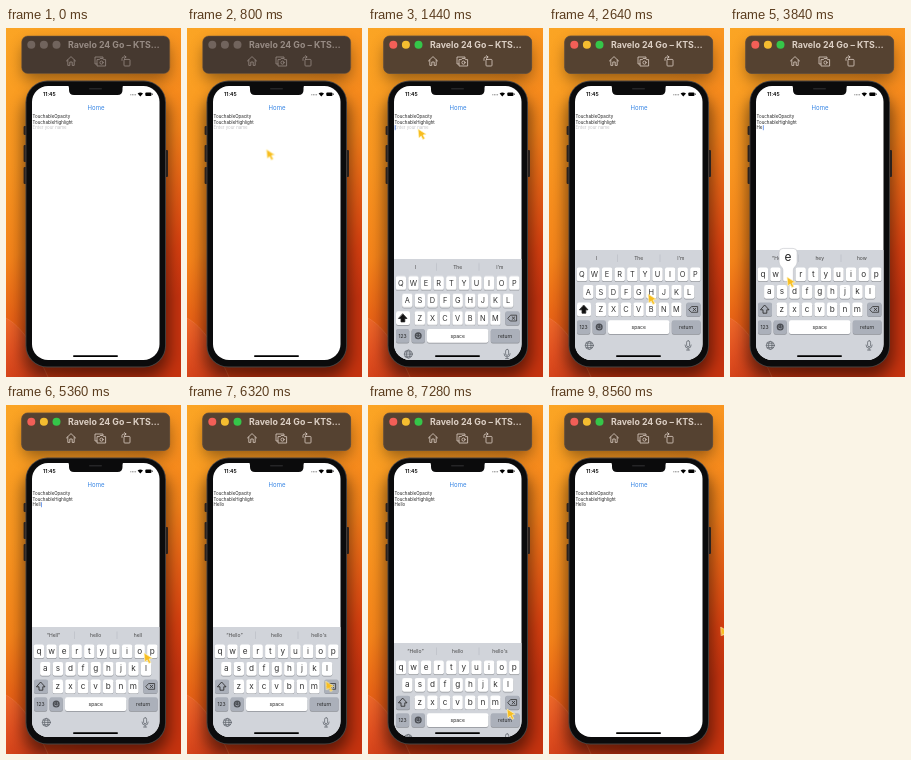
Write an HTML page that moves like this. It is 175x349 px and loops after 8.64 s.

```html
<!DOCTYPE html>
<html lang="en">
<head>
<meta charset="utf-8">
<title>Text input demo</title>
<style>
html, body { margin: 0; width: 100%; height: 100%; overflow: hidden; background: #ee8119; }
svg { display: block; width: 100%; height: 100%; }
text { font-family: Inter, "Liberation Sans", sans-serif; }
.mid { text-anchor: middle; }
.body { font-size: 4.4px; fill: #222; }
.line { fill: none; stroke-width: .8; stroke-linecap: round; stroke-linejoin: round; }
</style>
</head>
<body>
<svg id="stage" viewBox="0 0 175 349" preserveAspectRatio="none">
  <defs>
    <linearGradient id="sky" x1="0" y1="0" x2=".4" y2="1">
      <stop offset="0" stop-color="#fba524"/>
      <stop offset=".35" stop-color="#f99520"/>
      <stop offset=".58" stop-color="#f4831a"/>
      <stop offset=".74" stop-color="#e65f15"/>
      <stop offset=".88" stop-color="#d84010"/>
      <stop offset="1" stop-color="#c6330f"/>
    </linearGradient>
    <linearGradient id="dune" x1="0" y1="0" x2=".6" y2="1">
      <stop offset="0" stop-color="#ee6a2a"/>
      <stop offset=".5" stop-color="#e04f20"/>
      <stop offset="1" stop-color="#c83a16"/>
    </linearGradient>
    <filter id="soft" x="-40%" y="-60%" width="180%" height="240%"><feGaussianBlur stdDeviation="7.5"/></filter>
    <clipPath id="screen"><rect x="26" y="58" width="127.5" height="274" rx="16"/></clipPath>
  </defs>

  <rect width="175" height="349" fill="url(#sky)"/>
  <path d="M0 290C16 299 28 318 42 349H0Z" fill="url(#dune)"/>
  <path d="M0 290C16 299 28 318 42 349" fill="none" stroke="#f58a55" stroke-width=".6" opacity=".6"/>
  <rect x="17" y="64" width="146" height="286" rx="24" opacity=".5" filter="url(#soft)"/>
  <rect x="17" y="16" width="146" height="36" rx="7" opacity=".4" filter="url(#soft)"/>

  <g id="bar"></g>

  <g fill="#2a211d">
    <rect x="17.6" y="98" width="3" height="9" rx="1"/>
    <rect x="17.6" y="117" width="3" height="17" rx="1"/>
    <rect x="17.6" y="139" width="3" height="17" rx="1"/>
    <rect x="159" y="122" width="3" height="27" rx="1"/>
  </g>
  <rect x="19.5" y="52.5" width="140.5" height="287" rx="22" fill="#4a4441"/>
  <rect x="20.4" y="53.4" width="138.7" height="285.2" rx="21" fill="#0b0b0c"/>

  <g clip-path="url(#screen)">
    <rect x="26" y="58" width="128" height="275" fill="#fff"/>
    <text x="37" y="68" font-size="5.2" font-weight="600">11:45</text>
    <g fill="#555">
      <circle cx="124.8" cy="66.8" r=".5"/><circle cx="126.4" cy="66.8" r=".5"/>
      <circle cx="128" cy="66.8" r=".5"/><circle cx="129.6" cy="66.8" r=".5"/>
    </g>
    <path d="M131.6 65.6Q134.3 63.2 137 65.6L134.3 68.4Z"/>
    <rect x="139.3" y="64.5" width="6.2" height="3.4" rx="1"/>
    <rect x="146" y="65.5" width=".6" height="1.4"/>
    <text class="mid" x="90" y="82" font-size="6" fill="#3584e4">Home</text>
    <text class="body" x="26.6" y="90.4">TouchableOpacity</text>
    <text class="body" x="26.6" y="95.9">TouchableHighlight</text>
    <g id="field"></g>
    <g id="keyboard"></g>
    <rect x="67" y="327.2" width="45" height="1.8" rx=".9"/>
  </g>
  <path d="M61 57H118Q116.5 57.5 116.5 60V62Q116.5 67 111.5 67H68Q63 67 63 62V60Q63 57.5 61 57Z" fill="#0b0b0c"/>
  <rect x="83" y="60" width="13" height="1.4" rx=".7" fill="#252527"/>

  <g id="pointer">
    <path d="M0 0L8.2 5.2L5 6L6.8 9.6L4.8 10.4L3.2 6.9L1 9Z" fill="#f8bd20" stroke="#fff2b8" stroke-width=".7" stroke-linejoin="round"/>
  </g>
</svg>
<script>
const LOOP = 8640;
const $ = id => document.getElementById(id);
let css = "";

// Steps are [ms, declarations]; each step runs to the next with the given easing.
function animate(id, steps, ease = "step-end") {
  const frames = steps.map(([t, rule]) => `${(t / LOOP * 100).toFixed(3)}%{${rule}}`).join("");
  css += `@keyframes ${id}-run{${frames}}#${id}{animation:${id}-run ${LOOP}ms ${ease} infinite}`;
}
function span(id, from, to = LOOP) {
  const steps = [[0, "opacity:0"], [from, "opacity:1"]];
  if (to < LOOP) steps.push([to, "opacity:0"]);
  steps.push([LOOP, `opacity:${to < LOOP ? 0 : 1}`]);
  animate(id, steps);
}
const shift = (x, y) => `transform:translate(${x}px,${y}px)`;

// Simulator title bar, idle and focused
function titleBar(id, fill, ink, lights) {
  const dots = lights.map((c, i) => `<circle cx="${25.3 + i * 12.6}" cy="16.8" r="4" fill="${c}"/>`).join("");
  return `<g id="${id}">
    <rect x="15.7" y="8" width="148" height="37.5" rx="6" fill="${fill}" stroke="#6b5440" stroke-width=".5"/>${dots}
    <text x="62" y="20" font-size="8.8" font-weight="700" fill="${ink}">Ravelo 24 Go – KTS…</text>
    <g class="line" stroke="${ink}">
      <path d="M60.4 33L65 28.6L69.6 33M61.8 32V37.4H63.8V34H66.2V37.4H68.2V32"/>
      <path d="M91 36H89V29H97V30.4M91.4 31.6H93.4L94.2 30.5H96.6L97.4 31.6H99.6V38H91.4Z"/>
      <circle cx="95.5" cy="34.6" r="1.6"/>
      <rect x="118" y="31.4" width="6" height="6.6" rx=".8"/>
      <path d="M116 32.4V30.6Q116 29 118 29H120M118.6 27.6L120 29L118.6 30.4"/>
    </g></g>`;
}
$("bar").innerHTML =
  titleBar("idle", "#463930", "#978b84", ["#71645d", "#71645d", "#71645d"]) +
  titleBar("focused", "#554231", "#dccfc4", ["#f25f57", "#f4bd30", "#35c649"]);

// Clicks that open and close the keyboard
const OPEN = 1200, CLOSE = 7245, SLIDE = 500;
span("focused", OPEN - 80);

// Typed value: text, start, end, caret x, suggestions
const values = [
  ["", OPEN, 2840, 26.8, ["I", "The", "I'm"]],
  ["H", 2840, 3800, 30.4, ["“H”", "hey", "how"]],
  ["He", 3800, 4720, 32.9, ["“He”", "hey", "how"]],
  ["Hel", 4720, 5040, 34.1, ["“Hel”", "help", "hello"]],
  ["Hell", 5040, 5760, 35.3, ["“Hell”", "hello", "hell"]],
  ["Hello", 5760, LOOP, 38.2, ["“Hello”", "hello", "hello's"]]
];
let field = `<text id="hint" class="body" x="26.6" y="101.4" style="fill:#c4c4c7">Enter your name</text>`;
let tips = "";
values.forEach(([text, from, to, x, words], i) => {
  field += `<g id="value${i}"><text class="body" x="26.6" y="101.4">${text}</text></g>
    <rect id="caret${i}" x="${x}" y="97.2" width=".7" height="5" fill="#3c78e8"/>`;
  tips += `<g id="tips${i}" font-size="5" fill="#444">` +
    words.map((w, n) => `<text class="mid" x="${47.5 + n * 42.2}" y="232">${w}</text>`).join("") + "</g>";
  span("value" + i, from, to);
  span("tips" + i, i ? from : 0, to);
  if (i && i < 5) span("caret" + i, from, to);
});
span("hint", 0, 2840);
const blink = (id, times) => animate(id, [[0, "opacity:0"],
  ...times.map((t, i) => [t, `opacity:${1 - i % 2}`]), [LOOP, "opacity:0"]]);
blink("caret0", [OPEN, 1700, 2100, 2600]);
blink("caret5", [5760, 6260, 6660, 7160]);
$("field").innerHTML = field;

// Keyboard
const rows = ["qwertyuiop", "asdfghjkl", "zxcvbnm"];
const left = [32.9, 39.3, 51.8], PITCH = 12.6;
const rowY = r => 239.4 + r * 17.6;
const GREY = "#abb0ba";
const key = (x, y, w, fill = "#fff") =>
  `<rect x="${x}" y="${y + .7}" width="${w}" height="13.8" rx="2" fill="#8d9096"/>
   <rect x="${x}" y="${y}" width="${w}" height="13.8" rx="2" fill="${fill}"/>`;

function letters(id, upper) {
  let out = "";
  rows.forEach((row, r) => [...row].forEach((ch, i) => {
    const x = left[r] + i * PITCH;
    out += `<text class="mid" x="${x}" y="${rowY(r) + (upper ? 9.6 : 9.2)}" fill="#333" font-size="${upper ? 7.4 : 8.2}">${upper ? ch.toUpperCase() : ch}</text>`;
  }));
  const arrow = "M34.9 277.3L39 281.8H36.8V285.2H33V281.8H30.8Z";
  out += key(28, rowY(2), 14, upper ? "#fff" : GREY) +
    `<path d="${arrow}" class="line" stroke="#222" ${upper ? 'style="fill:#111"' : ""}/>`;
  return `<g id="${id}">${out}</g>`;
}

function popup(id, ch, r, i) {
  return `<g id="${id}"><g transform="translate(${left[r] + i * PITCH} ${rowY(r)})">
    <path d="M-9-15q0-4 4-4h10q4 0 4 4v9c0 5-3.8 5-3.8 9v9q0 2-2 2h-6.4q-2 0-2-2v-9c0-4-3.8-4-3.8-9z"
      fill="#fff" stroke="#b4b7bd" stroke-width=".5"/>
    <text class="mid" y="-6.8" font-size="12" fill="#222">${ch}</text></g></g>`;
}

let board = `<rect x="26" y="222" width="128" height="112" fill="#d1d4da"/>
  <path d="M68.5 226.5V234M111 226.5V234" stroke="#b3b7be" stroke-width=".5"/>` + tips;
rows.forEach((row, r) => [...row].forEach((_, i) => board += key(left[r] + i * PITCH - 5.2, rowY(r), 10.4)));
const low = rowY(3);
board += letters("upper", true) + letters("lower", false) +
  key(137.3, rowY(2), 14.2, GREY) +
  `<path class="line" stroke="#333" d="M140 281.4L142.6 278.5H148.6V284.3H142.6ZM144.2 280.2L146.8 282.7M146.8 280.2L144.2 282.7"/>` +
  key(28, low, 13.2, GREY) + key(43.6, low, 13.2, GREY) + key(59, low, 61.4) + key(122.8, low, 28.8, GREY) +
  `<g class="mid" font-size="5" fill="#222"><text x="34.6" y="300.9">123</text>
    <text x="89.7" y="300.9">space</text><text x="137.2" y="300.9">return</text></g>
  <circle cx="50.2" cy="299" r="3.5" fill="#4b4e54"/>
  <g class="line" stroke="${GREY}"><path d="M48.4 300Q50.2 302.2 52 300M49 297.8V298.2M51.4 297.8V298.2"/></g>
  <g class="line" stroke="#656a72"><circle cx="40.3" cy="317.4" r="4"/><ellipse cx="40.3" cy="317.4" rx="1.8" ry="4"/>
    <path d="M36.3 317.4H44.3M37.2 315.2H43.4M37.2 319.6H43.4"/>
    <rect x="137.6" y="312.7" width="3" height="6" rx="1.5"/>
    <path d="M136 317Q136 320.2 139.1 320.2Q142.2 320.2 142.2 317M139.1 320.2V322M137.5 322H140.7"/></g>`;

// A key is held for a moment before its letter appears
const presses = [["H", 1, 5], ["e", 0, 2], ["l", 1, 8], ["l", 1, 8], ["o", 0, 8]];
presses.forEach(([ch, r, i], n) => {
  const typed = values[n + 1][1];
  board += popup("pop" + n, ch, r, i);
  span("pop" + n, typed - 80, typed + 80);
});
board += `<g id="tap"><rect x="122.8" y="${low}" width="28.8" height="13.8" rx="2" fill="#fff" opacity=".7"/></g>`;
span("tap", CLOSE - 120, CLOSE - 10);
span("upper", 0, 2920);
span("lower", 2920);
$("keyboard").innerHTML = board;

const down = shift(0, 112), up = shift(0, 0);
animate("keyboard", [[0, down], [OPEN, down], [OPEN + SLIDE, up], [CLOSE, up], [CLOSE + SLIDE, down], [LOOP, down]],
  "cubic-bezier(.38,.7,.125,1)");

// Pointer: time, x, y of the tip
const path = [
  [0, 178, 190], [320, 178, 190], [1040, 50, 101], [1520, 50, 101], [2560, 99, 266], [2960, 99, 266],
  [3680, 57, 249], [3920, 57, 249], [4560, 138, 266], [5080, 138, 266], [5360, 138, 248],
  [5920, 138, 248], [6720, 139, 304], [7400, 139, 304], [8480, 171.5, 222], [8560, 171.5, 222], [LOOP, 178, 222]
];
animate("pointer", path.map(([t, x, y]) => [t, shift(x, y)]), "ease-in-out");

const sheet = document.createElement("style");
sheet.textContent = css;
document.head.append(sheet);
</script>
</body>
</html>
```
